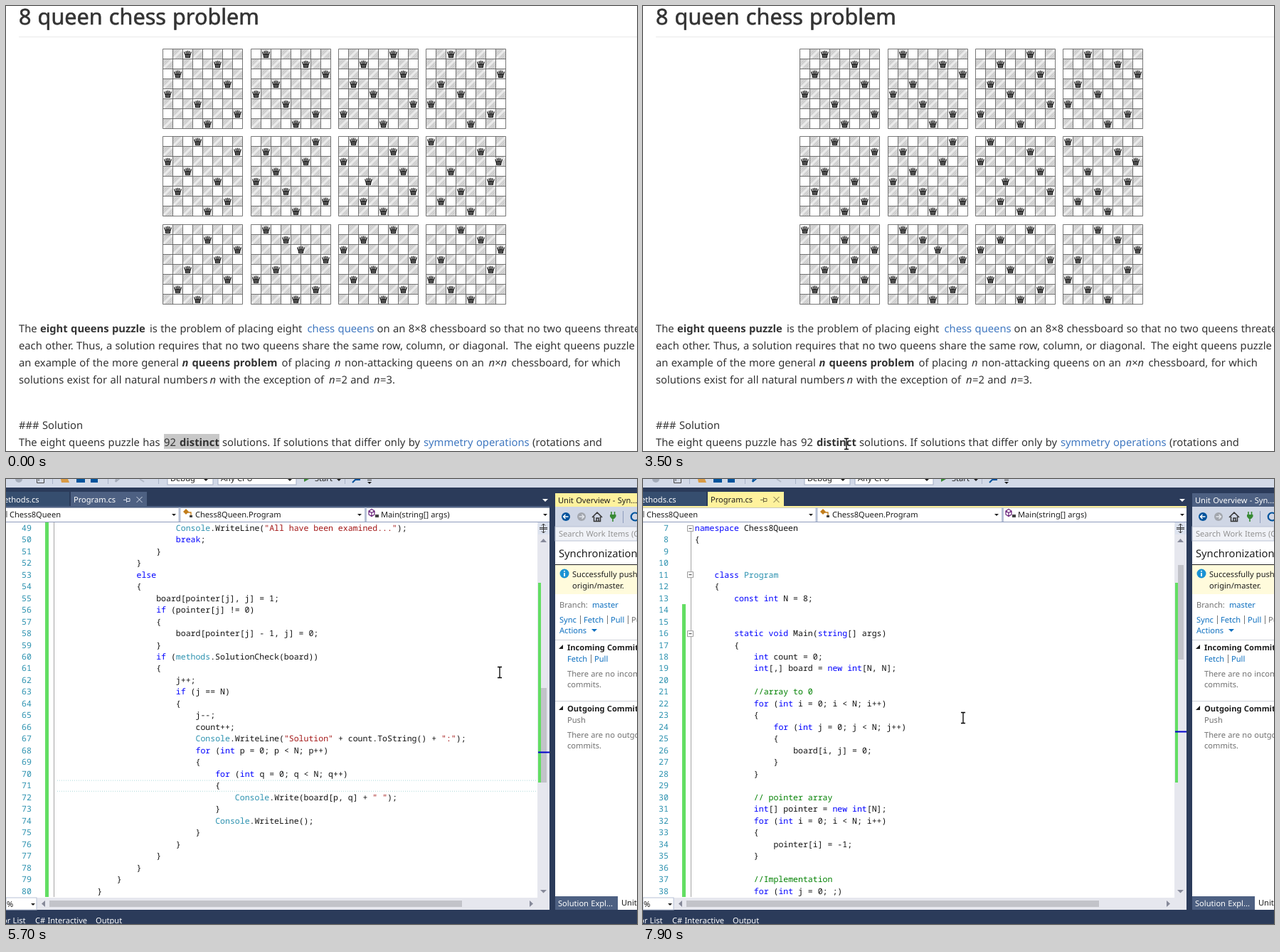
Recreate the animation shown at these times as an HTML page. Size 887 by 626 pixels, loop 8 s.

```html
<!DOCTYPE html>
<html lang="en">
<head>
<meta charset="utf-8">
<title>Eight queens</title>
<style>
html, body { margin: 0; width: 100%; height: 100%; overflow: hidden; background: #fff; }
svg { display: block; width: 887px; height: 626px; }
text { font-family: "Noto Sans", "Open Sans", sans-serif; text-rendering: geometricPrecision; white-space: pre; word-spacing: .037em; }
.mono { font-family: "Noto Sans Mono", "DejaVu Sans Mono", monospace; font-size: 11.53px; word-spacing: 0; }
.b { font-weight: 700; }
.i { font-style: italic; }
.head { stroke: #333; stroke-width: .6px; }
.doc, .on .tool { fill: #4d6082; }
.tool, .on .doc { fill: #fff29d; }
.docText, .on .toolText { fill: #fff; }
.toolText, .on .docText { fill: #1e1e1e; }
.docLine { stroke: #d5dcea; }
.on .docLine { stroke: #6f6640; }
</style>
</head>
<body>
<svg id="stage" viewBox="0 0 887 626"></svg>
<script>
const LOOP = 8000, TICK = 100;
const PITCH = 16.48, CHAR = 6.918, FIRST = 49;

const esc = s => s.replace(/&/g, '&amp;').replace(/</g, '&lt;');
const text = (x, y, s, fill = '#333', size = 14.78, cls = '') =>
  `<text x="${x}" y="${y}" fill="${fill}" font-size="${size}" class="${cls}">${esc(s)}</text>`;
const small = (x, y, s, fill = '#1e1e1e', cls = '') => text(x, y, s, fill, 11.1, cls);
const themed = (x, y, s, cls) => `<text x="${x}" y="${y}" font-size="11.1" class="${cls}">${s}</text>`;
const rect = (x, y, w, h, fill, more = '') =>
  `<rect x="${x}" y="${y}" width="${w}" height="${h}" fill="${fill}" ${more}/>`;
const path = (d, stroke, width = 1, fill = 'none', more = '') =>
  `<path d="${d}" stroke="${stroke}" stroke-width="${width}" fill="${fill}" ${more}/>`;
const disc = (x, y, r, fill) => `<circle cx="${x}" cy="${y}" r="${r}" fill="${fill}"/>`;
const down = (x, y, fill = '#1e1e1e', r = 3) => path(`M${x - r} ${y}h${2 * r}l${-r} ${r}z`, 'none', 0, fill);

// ---- article ----
// Column of the queen in each row; a few queens sit between two columns.
const BOARDS = [
  '2 5 1 6 0 3 7 4', '1 5 7 2 0 3 6 4', '5 2 6 1 3 7 0 4', '2 5 7 1 3 0 6 4',
  '3 7 0 2 5 1 6 4', '6 1 5 2 0 3 7 4', '1 5 0 6 2.5 7 2 4', '0 5 6.8 2 6 3 1 4',
  '0 4 7 5 2 6 1 3', '1 3 4.5 7 2 0 6 4', '5 2 0 7 3 1 6 4', '3 5 7 1 6 0 2 4'
];

function board(cols, n) {
  const x = Math.round(220.4 + n % 4 * 123.2), y = Math.round(60 + Math.floor(n / 4) * 123.3);
  const queens = cols.split(' ');
  let dark = '', grid = '', men = '';
  for (let r = 0; r < 8; r++) {
    for (let c = 0; c < 8; c++) if ((r + c) % 2) dark += `M${c * 14} ${r * 14}h14v14h-14z`;
    men += `<use href="#queen" x="${queens[r] * 14}" y="${r * 14}"/>`;
  }
  for (let k = 0; k <= 8; k++) grid += `M${k * 14} 0v112M0 ${k * 14}h112`;
  return `<g transform="translate(${x + .5} ${y + .5})">` +
    path(dark, 'none', 0, 'url(#hatch)') + path(grid, '#555', .8) + men + '</g>';
}

const LINK = '#4078c0';
const article = [
  [18, 459, 'The'], [48, 459, 'eight queens puzzle', 'b'], [202, 459, 'is the problem of placing eight'],
  [423.5, 459, 'chess queens', '', LINK], [521.5, 459, 'on an 8×8 chessboard so that no two queens threaten'],
  [18, 483, 'each other. Thus, a solution requires that no two queens share the same row, column, or diagonal.'],
  [714, 483, 'The eight queens puzzle'],
  [18, 507, 'an example of the more general'], [247.5, 507, 'n', 'b i'], [261.5, 507, 'queens problem', 'b'],
  [387.5, 507, 'of placing'], [462, 507, 'n', 'i'], [476, 507, 'non-attacking queens on an'],
  [678.5, 507, 'n×n', 'i'], [710.5, 507, 'chessboard, for which'],
  [18, 531, 'solutions exist for all natural numbers'], [286.5, 531, 'n', 'i'], [300, 531, 'with the exception of'],
  [454, 531, 'n', 'i'], [463, 531, '=2 and'], [517, 531, 'n', 'i'], [526, 531, '=3.'],
  [18, 595, '### Solution'],
  [18, 619, 'The eight queens puzzle has'], [222, 619, '92'], [244, 619, 'distinct', 'b'],
  [304, 619, 'solutions. If solutions that differ only by'],
  [587, 619, 'symmetry operations', '', LINK], [740, 619, '(rotations and']
];

const page = rect(0, 0, 887, 626, '#fff') +
  text(18, 26, '8 queen chess problem', '#333', 30.6, 'head') +
  rect(18, 43, 869, 1, '#eaeaea') +
  BOARDS.map(board).join('') +
  rect(222, 602, 78, 21, '#c8c8c8', 'id="mark"') +
  article.map(([x, y, s, cls, fill]) => text(x, y, s, fill, undefined, cls)).join('');

// ---- code ----
const CODE = `namespace Chess8Queen
{


    class Program
    {
        const int N = 8;


        static void Main(string[] args)
        {
            int count = 0;
            int[,] board = new int[N, N];

            //array to 0
            for (int i = 0; i < N; i++)
            {
                for (int j = 0; j < N; j++)
                {
                    board[i, j] = 0;
                }
            }

            // pointer array
            int[] pointer = new int[N];
            for (int i = 0; i < N; i++)
            {
                pointer[i] = -1;
            }

            //Implementation
            for (int j = 0; ;)
            {
                pointer[j]++;
                if (pointer[j] == N)
                {
                    board[pointer[j] - 1, j] = 0;
                    pointer[j] = -1;
                    j--;
                    if (j == -1)
                    {
                        Console.WriteLine();
                        Console.WriteLine("All have been examined...");
                        break;
                    }
                }
                else
                {
                    board[pointer[j], j] = 1;
                    if (pointer[j] != 0)
                    {
                        board[pointer[j] - 1, j] = 0;
                    }
                    if (methods.SolutionCheck(board))
                    {
                        j++;
                        if (j == N)
                        {
                            j--;
                            count++;
                            Console.WriteLine("Solution" + count.ToString() + ":");
                            for (int p = 0; p < N; p++)
                            {
                                for (int q = 0; q < N; q++)
                                {
                                    Console.Write(board[p, q] + " ");
                                }
                                Console.WriteLine();
                            }
                        }
                    }
                }
            }
        }`.split('\n');

const TOKEN = /(\/\/.*)|("[^"]*")|\b(namespace|class|const|int|static|void|string|new|for|if|else|break)\b|\b(Console|Program|methods)\b/g;
const INK = ['#008000', '#a31515', '#0000ff', '#2b91af'];
const base = n => 72.7 + PITCH * (n - FIRST);

function paint(line) {
  let out = '', at = 0;
  for (const m of line.matchAll(TOKEN)) {
    const kind = m.slice(1).findIndex(Boolean);
    out += esc(line.slice(at, m.index)) + `<tspan fill="${INK[kind]}">${esc(m[0])}</tspan>`;
    at = m.index + m[0].length;
  }
  return out + esc(line.slice(at));
}

function codeLine(line, k) {
  const n = k + 7, y = base(n), body = line.trimStart();
  const x = 72.8 + (line.length - body.length) * CHAR;
  return `<text class="mono" x="35.8" y="${y}" text-anchor="end" fill="#2b91af">${n}</text>` +
    (body && `<text class="mono" x="${x}" y="${y}" fill="#111">${paint(body)}</text>`);
}

const fold = n => {
  const y = Math.round(base(n) - 8) + .5;
  return path(`M62.5 ${y}h8v8h-8z`, '#999', 1, '#fff') + path(`M64.5 ${y + 4}h4`, '#333');
};

const listing = rect(55, base(14) - 12, 5, PITCH * 72, '#63de63') +
  path(`M67.5 ${base(7) - 4}V620`, '#a5a5a5') + [7, 11, 16].map(fold).join('') +
  path(`M72 ${base(71) - 11.2}H747M72 ${base(71) + 4}H747`, '#a9d9d9', 1, 'none', 'id="dotted" stroke-dasharray="1 2"') +
  `<g id="here">${rect(72.5, base(64) - 11.2, 674, 14.5, '#fff', 'stroke="#e3e3ec" stroke-width="1.6"')}</g>` +
  CODE.map(codeLine).join('') +
  rect(246, base(64) - 11, 1.2, 14, '#000', 'id="caret"');

// ---- window around the code ----
const NAVY = '#2b3b5a', BAR = '#d3dae8', BLUE = '#0e70c0', GREY = '#717171';

const toolbar = rect(0, 0, 887, 12, BAR) +
  disc(18, 0, 5, '#a4acba') + path('M43.5 0V5.500H53.500V0M46 0V3', '#444') +
  path('M77 0h10l2 5H78z', 'none', 0, '#d99b45') + rect(99, 0, 12, 5, '#00539c') + rect(119, 0, 10, 5, '#00539c') +
  path('M65.500 0V7M143.500 0V7M214.500 0V7M476.500 0V7', '#a9b3c8') +
  path('M154 4l7-6M155 0l-1 4', '#a4acba', 2, 'none', 'id="undo"') + path('M188 0l6 4', '#b3bac8', 2) +
  rect(227, -4, 64, 12, '#fff', 'stroke="#a3aec5"') + rect(298, -4, 110, 12, '#fff', 'stroke="#a3aec5"') +
  small(231, 3, 'Debug') + small(302, 3, 'Any CPU') + small(434, 3, 'Start') +
  down(281, 0) + down(399, 0) + path('M419 -4l7 4-7 4z', 'none', 0, '#388a34') + down(468, 0) +
  path('M487 5l4-4h6v-3', '#00539c', 2) + path('M508 1.500h6', '#333') + down(511, 4);

const tabs = rect(0, 18, 89, 20, '#364e6f') + small(-3, 33, 'ethods.cs', '#fff') +
  '<path class="doc" d="M91 18H198V38H764V40.500H0V38H91z"/>' + themed(95, 33, 'Program.cs', 'docText') +
  '<path class="docLine" fill="none" d="M165 29.500h4M169.500 26v7M170 27.500h4v4h-4M183.500 25l8 8M191.500 25l-8 8"/>' +
  down(758, 28, '#fff', 4);

const nav = rect(0, 40.5, 764, 20, '#fff') + path('M0 60.500H764', '#8e9bbc') +
  path('M244 40V60M505.500 40V60', '#b7c1d6', 3) + path('M1 45v9', '#555') +
  [236, 497, 758].map(x => down(x, 49)).join('') +
  small(5, 54, 'Chess8Queen') + small(266, 54, 'Chess8Queen.Program') + small(527, 54, 'Main(string[] args)') +
  path('M249 46l4-4 4 4-4 4z', 'none', 0, '#c27d1a') + path('M255 47h5v6', '#c27d1a', 1.300) +
  rect(258, 51, 4, 3, '#444') + path('M510 45l4-2.500 4 2.500v5l-4 2.500-4-2.500zl4 2.500 4-2.500M514 47.500v5', '#68217a', 1.200) +
  rect(519, 50, 5, 4, '#444');

const scrollbars = rect(747, 61, 17, 528, '#e6e7ee') + rect(748, 61, 16, 17, '#dce2ee') +
  path('M750 68.500h11M750 70.500h11M755.500 63v13M753 65.500l2.500-2.500 2.500 2.500M753 73.500l2.500 2.500 2.500-2.500', '#333') +
  path('M751 89h9l-4.500-5z', 'none', 0, '#868999') + down(755.5, 578, '#868999', 4.5) +
  rect(748, 146, 4, 281, '#63de63') + rect(752, 294, 8, 133, '#c2c3c9', 'id="thumb"') +
  rect(748, 383, 16, 2, '#0000cd', 'id="spot"') +
  rect(0, 589, 764, 17, '#e6e7ee') + rect(0, 589, 43, 17, '#fff', 'stroke="#b7c1d6"') + small(1, 602, '%') + down(38, 597) +
  path('M55 593v9l-5-4.500z', 'none', 0, '#868999') + path('M736 593v9l5-4.500z', 'none', 0, '#868999') +
  rect(61, 593, 580, 9, '#c2c3c9');

const bottom = small(-5, 625, 'or List', '#fff') + small(41, 625, 'C# Interactive', '#fff') + small(126, 625, 'Output', '#fff');

const rule = (x, y) => path(`M${x} ${y - 10}v12`, '#777');
const section = (y, title) => path(`M783 ${y - 8}v6h-6z`, 'none', 0, '#1e1e1e') + small(789, y, title, '#1e1e1e', 'b');

const panel = rect(772, 20, 115, 586, '#fff') +
  '<rect class="tool" x="772" y="20" width="115" height="19"/>' + themed(776, 34, 'Unit Overview - Syn...', 'toolText') +
  rect(772, 39, 115, 28, '#cfd6e5') +
  disc(787, 53, 6, '#00539c') + path('M790.500 53h-7M786.500 50l-3 3 3 3', '#fff', 1.400) +
  disc(809, 53, 6, '#a2a6ad') + path('M805.500 53h7M809.500 50l3 3-3 3', '#e4e7ee', 1.400) +
  path('M824 54l7-7 7 7M826.500 53v6.500h9V53M830 59v-4h3v4', '#333', 1.500) +
  path('M851 46v4M855.500 46v4M853 55v5', '#388a34', 1.600) + path('M849 50h8.500v3l-2.500 3h-3.500l-2.500-3z', 'none', 0, '#388a34') +
  path('M867.500 45v17', '#8e9bbc') + path('M888 49a5.500 5.500 0 1 0 0 8', '#00539c', 2.200) +
  rect(772, 67, 115, 20, '#f0f2f7', 'stroke="#b9c2d4"') + small(777, 81, 'Search Work Items (Ctrl', '#929292') +
  text(777, 110, 'Synchronization', '#1e1e1e', 14.7) + rect(772, 120, 115, 1.3, '#222') +
  rect(772, 121, 115, 41, '#fffbdc') + disc(785, 133, 6.5, '#1b93d4') + path('M785 132v5M785 129v1.500', '#fff', 1.800) +
  small(796, 138, 'Successfully pushed') + small(796, 154, 'origin/master.') +
  small(778, 181, 'Branch:', GREY) + small(824, 181, 'master', BLUE) +
  small(778, 202, 'Sync', BLUE) + rule(807.5, 202) + small(812, 202, 'Fetch', BLUE) + rule(845.5, 202) +
  small(850, 202, 'Pull', BLUE) + rule(874.5, 202) + small(879, 202, 'Push', GREY) +
  small(778, 217, 'Actions', BLUE) + down(827, 211, BLUE, 4) +
  rect(772, 226, 115, 1, '#cfd3da') + section(241, 'Incoming Commits') +
  small(789, 257, 'Fetch', BLUE) + rule(822.5, 257) + small(827, 257, 'Pull', BLUE) +
  small(789, 278, 'There are no incoming', GREY) + small(789, 293, 'commits.', GREY) +
  rect(772, 312, 115, 1, '#cfd3da') + section(327, 'Outgoing Commits') + small(789, 343, 'Push', GREY) +
  small(789, 364, 'There are no outgoing', GREY) + small(789, 379, 'commits.', GREY) +
  rect(772, 587, 88, 19, '#4d6082') + small(776, 601, 'Solution Expl...', '#fff') + small(865, 600, 'Unit');

const ide = rect(0, 0, 887, 626, NAVY) + toolbar + tabs + rect(0, 61, 747, 528, '#fff') +
  `<g clip-path="url(#view)"><g id="code">${listing}</g></g>` + nav + scrollbars + bottom + panel;

// Fine diagonals with one lighter streak through the middle of each dark cell.
const diagonal = k => `M${k - 14} 14L14 ${k - 14}`;
const hatch = Array.from({ length: 10 }, (_, i) => diagonal((i + .5) * 2.8)).join('');

const defs = `<defs>
  <pattern id="hatch" width="14" height="14" patternUnits="userSpaceOnUse">
    ${rect(0, 0, 14, 14, '#f2f2f2') + path(hatch, '#777', .75) + path(diagonal(14), '#f4f4f4', 2)}
  </pattern>
  <clipPath id="view"><rect x="0" y="61" width="747" height="527"/></clipPath>
  <g id="queen">
    <path d="M2 2h10v11H2z" fill="#fff" opacity=".75"/>
    <path d="M3.500 8L2.200 4M5.300 8L4.700 2.800M7 8V2.300M8.700 8l.6-5.200M10.500 8l1.300-4" stroke="#000" stroke-width="1.200"/>
    <path d="M3 7.500h8l-.7 5H3.700z"/><path d="M4 9h6M4.300 11h5.400" stroke="#fff" stroke-width=".6"/>
  </g></defs>`;

const cursors = `<g id="cursor" stroke="#000">
  <path id="arrow" fill="#fff" d="M0 0V16.500L3.800 13L6.400 19.200L9 18.100L6.400 12H11.800Z"/>
  <path id="hand" fill="#fff" d="M-1.500 1.500Q0-.5 1.500 1.500V8Q3.300 6.400 4.400 8.400Q6 7.400 7 9.200Q9 9 9 11V15Q9 17 7.500 18.500V21.500H-1.500V19.500L-5.500 13.500Q-6 10.800-4 11.200L-1.500 13.500Z"/>
  <path id="beam" fill="none" stroke-width="1.300" d="M-3-7.500H3M0-7.500V7.500M-3 7.500H3"/></g>`;

document.getElementById('stage').innerHTML =
  defs + `<g id="page">${page}</g><g id="ide">${ide}</g>` + cursors;

// ---- motion ----
const $ = id => document.getElementById(id);
const show = (id, on) => { $(id).style.display = on ? '' : 'none'; };

const CUT = 4700, DESELECT = 3300, CLICK = 6400, SCROLL = 7000;
// Pointer strokes as [ms, x, y]; the pointer is hidden between strokes.
const STROKES = [
  [[100, 804, 519], [800, 330, 109], [900, 328, 125], [1300, 303, 128], [1500, 296, 150],
   [1800, 652, 161], [2000, 736, 126], [2400, 143, 600], [2500, 152, 612], [2600, 152, 612]],
  [[2800, 226, 614], [3200, 296, 614], [3600, 283, 616], [3700, 285, 606], [4000, 306, 582], [4300, 306, 582]],
  [[5200, 61, 590], [5300, 150, 500], [5500, 724, 162], [5700, 694, 272], [6000, 560, 300], [CLICK, 252, 318],
   [6900, 450, 493], [7200, 450, 493], [7800, 450, 330], [7900, 450, 336], [LOOP, 450, 336]]
];

function pointer(t) {
  const s = STROKES.find(s => t >= s[0][0] && t < s[s.length - 1][0]);
  if (!s) return null;
  const k = s.findIndex(p => p[0] > t), [t0, x0, y0] = s[k - 1], [t1, x1, y1] = s[k];
  const f = (t - t0) / (t1 - t0);
  return [x0 + (x1 - x0) * f, y0 + (y1 - y0) * f];
}

function shape(t, x, y) {
  if (t >= CUT) return y > 588 ? 'arrow' : 'beam';
  if (x > 220 && x < 703 && y > 59 && y < 420) return 'hand';
  return y > 603 || (y > 444 && y < 490) ? 'beam' : 'arrow';
}

function topLine(t) {
  const f = Math.min(1, Math.max(0, (t - SCROLL + TICK) / 900));
  return FIRST - 3 * Math.round(14 * f);
}

function draw(t) {
  const inIde = t >= CUT, clicked = t >= CLICK, top = topLine(t);
  show('page', !inIde);
  show('ide', inIde);
  show('mark', t < DESELECT);
  $('ide').setAttribute('class', clicked ? 'on' : '');
  show('dotted', !clicked);
  show('here', clicked);
  show('caret', clicked && Math.floor((t - CLICK) / 530) % 2 === 0);
  $('spot').setAttribute('y', clicked ? 354.5 : 383.5);
  $('code').setAttribute('transform', `translate(0 ${(FIRST - top) * PITCH})`);
  $('thumb').setAttribute('y', 294 - (FIRST - top) * 4.12);
  $('undo').setAttribute('stroke', t >= SCROLL ? '#00539c' : '#a4acba');

  const at = pointer(t);
  show('cursor', at);
  if (at) {
    const kind = shape(t, ...at);
    for (const id of ['arrow', 'hand', 'beam']) show(id, id === kind);
    $('cursor').setAttribute('transform', `translate(${at.map(Math.round)})`);
  }
}

function frame() {
  draw(Math.floor(performance.now() % LOOP / TICK) * TICK);
  requestAnimationFrame(frame);
}
frame();
</script>
</body>
</html>
```
